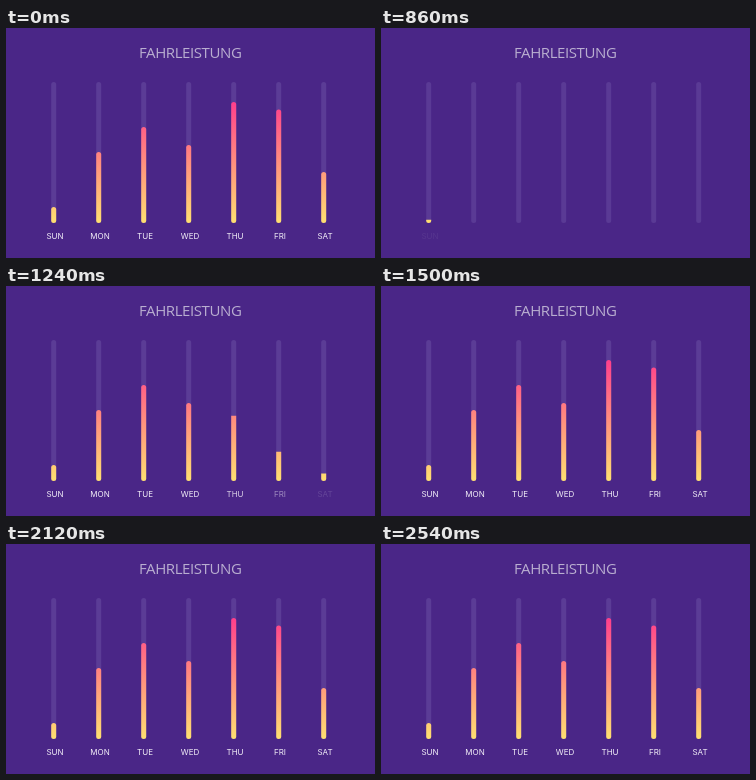
An HTML page with a canvas that plays this animation: 369x230 px, repeating every 8 s.

```html
<!DOCTYPE html>
<html lang="de">
<head>
<meta charset="utf-8">
<title>Fahrleistung</title>
<style>
html, body { margin: 0; width: 100%; height: 100%; overflow: hidden; background: #4a2687; }
canvas { display: block; }
</style>
</head>
<body>
<canvas width="369" height="230"></canvas>
<script>
const ctx = document.querySelector('canvas').getContext('2d');
const LOOP = 8000, CUT = 500;
const TOP = 54, BOTTOM = 195, WIDTH = 5;
const days = [['SUN', 179], ['MON', 124], ['TUE', 99], ['WED', 117], ['THU', 74], ['FRI', 81.5], ['SAT', 144]];

const heat = ctx.createLinearGradient(0, 74, 0, BOTTOM);
heat.addColorStop(0, '#ff3e8c');
heat.addColorStop(1, '#ffe070');

const clamp = v => Math.min(1, Math.max(0, v));
const smooth = v => (v = clamp(v), v * v * (3 - 2 * v));
const easeInOut = v => (v = clamp(v), v < .5 ? 2 * v * v : 1 - 2 * (1 - v) ** 2);

function pill(x, top, fill) {
  ctx.fillStyle = fill;
  ctx.beginPath();
  ctx.roundRect(x, top, WIDTH, BOTTOM - top, WIDTH / 2);
  ctx.fill();
}

function label(text, x, y, font, color, spacing = '0px') {
  ctx.font = font;
  ctx.letterSpacing = spacing;
  ctx.fillStyle = color;
  ctx.fillText(text, x, y);
}

function draw(t) {
  if (t < CUT) t += LOOP;
  ctx.globalAlpha = 1;
  ctx.fillStyle = '#4a2687';
  ctx.fillRect(0, 0, 369, 230);
  ctx.textAlign = 'left';
  label('FAHRLEISTUNG', 133, 30, '15px "Open Sans", "Noto Sans", sans-serif', '#b9aed0', '-0.4px');
  ctx.textAlign = 'center';

  days.forEach(([name, top], i) => {
    const x = 45.2 + 45 * i;
    const age = t - 820 - 60 * i;
    ctx.globalAlpha = .06 + .94 * smooth((t - 560) / 340);
    pill(x, TOP, '#5b3c96');
    if (age <= 0) return;

    // The bar is uncovered upwards by a flat-edged window.
    const reveal = (BOTTOM - TOP) * easeInOut(age / 376);
    ctx.globalAlpha = 1;
    ctx.save();
    ctx.beginPath();
    ctx.rect(x - 1, BOTTOM - reveal, WIDTH + 2, reveal);
    ctx.clip();
    pill(x, top, heat);
    ctx.restore();

    ctx.globalAlpha = smooth(age / 240);
    label(name, 49 + 45 * i, 210.6, '8px Inter, sans-serif', '#f3eff8');
  });
}

function frame() {
  draw(performance.now() % LOOP);
  requestAnimationFrame(frame);
}
frame();
</script>
</body>
</html>
```
